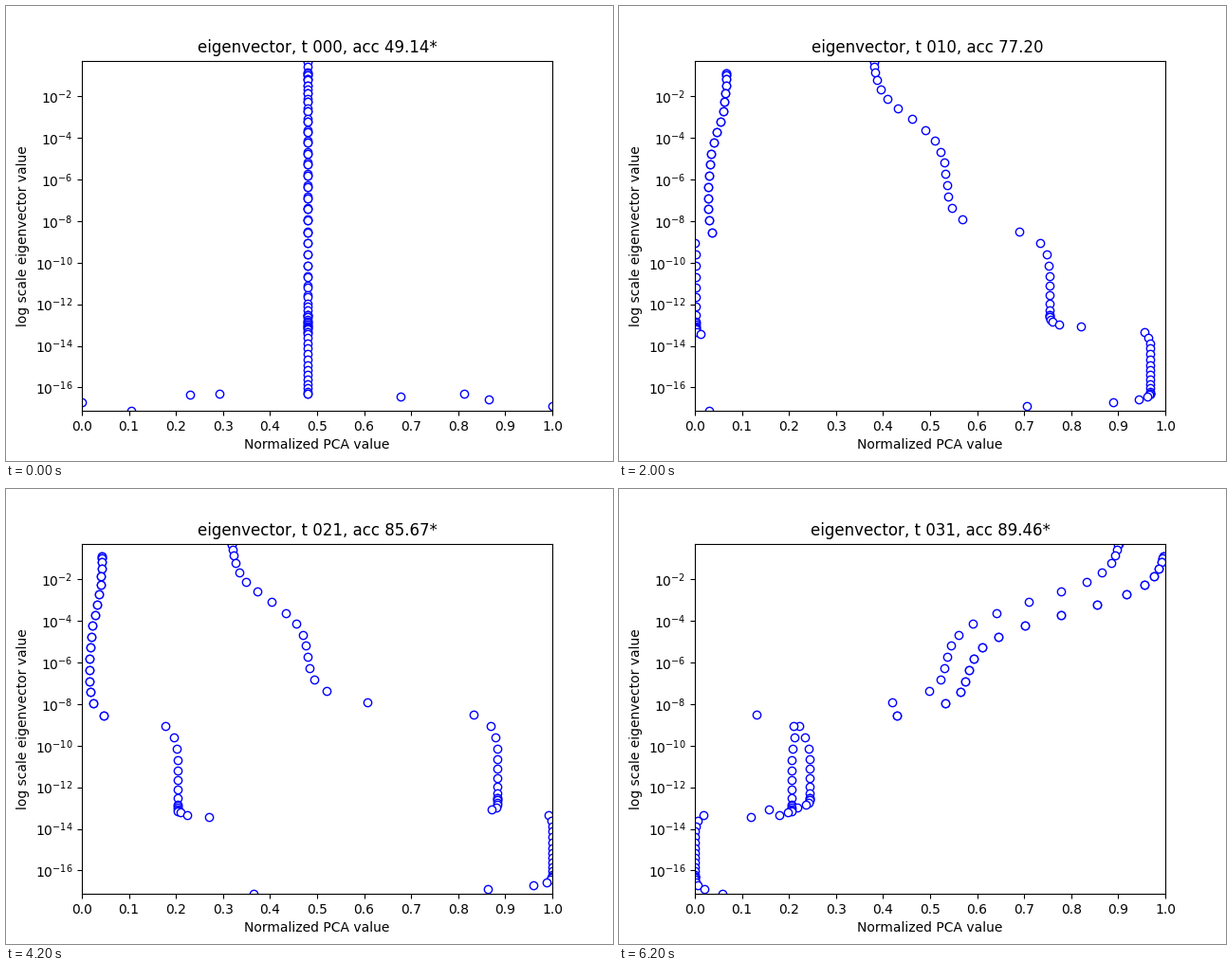
Write a matplotlib script that moves like this. It is 640 px wide and 480 px high and loops after 6.4 s.

```python
import numpy as np
import matplotlib.pyplot as plt
from matplotlib.animation import FuncAnimation

FRAMES, INTERVAL = 32, 200
TOP, HEIGHT = 57.6, 369.6          # plot area in pixels
TOP_EXP, DECADE = -0.275, 21.927   # exponent at the top, pixels per decade
FLIP = 24                          # the component changes sign here

plt.rcParams["font.family"] = "DejaVu Sans"


def bend(k):
    """Crowded near k = 0, evenly spaced further on."""
    return 12.37 * (np.hypot(k, 3.9) - 3.9)


def landing(bottom, steps, scale, tail):
    """Heights that slow down towards the bottom, then a loose tail."""
    return np.append(bottom - scale * bend(np.arange(steps, -1, -1)), tail)


# Heights in pixels, one array per chain.
falling = bend(np.arange(18))
pairs = 71 + falling
upper = TOP + falling
singles = landing(339.5, 10, 1.06, np.linspace(334, 346, 6))
lower = landing(327.5, 10, 1.06, np.linspace(326, 338, 6))
floor = landing(409.5, 14, 0.5, 409 + 18 * np.linspace(0, 1, 8) ** 2)

# The first chain is doubled.
heights = np.concatenate([pairs, pairs, singles, upper, lower, floor])
values = 10 ** (TOP_EXP - (heights - TOP) / DECADE)
order = np.argsort(heights, kind="stable")


def smooth_step(n):
    return 1 / (1 + np.exp((np.arange(n) - 7.9) / 1.3))


def decay(n):
    return 0.3 ** np.arange(n)


def chain(n, head, start, middle, end):
    """A constant middle that leans to start and end values."""
    tail = decay(n)[::-1]
    return middle + (start - middle) * head(n) + (end - middle) * tail


def pose(pair, single, up, low, ground, last):
    doubled = chain(len(pairs), smooth_step, *pair)
    return np.concatenate([
        doubled, doubled,
        chain(len(singles), decay, *single),
        chain(len(upper), smooth_step, *up),
        chain(len(lower), decay, *low),
        chain(len(floor) - 1, decay, *ground), [last]])


def first_pose():
    x = np.full(len(heights), 0.48)
    x[-8:] = 0.292, 0.812, 0.23, 0.677, 0.865, 0, 1, 0.105
    return x


# Start, middle and end of each chain, then the lowest point.
poses = {
    0: first_pose(),
    5: pose((.05, .02, .022), (0, .002, .01), (.988, .94, .938),
            (.873, .87, .87), (.671, .668, .625), .022),
    10: pose((.067, .028, .036), (0, .002, .012), (.38, .536, .569),
             (.69, .754, .821), (.956, .968, .706), .03),
    14: pose((.045, .021, .016), (0, .02, .042), (.31, .423, .508),
             (.671, .784, .805), (.992, .981, .714), .067),
    21: pose((.042, .015, .046), (.177, .204, .27), (.318, .483, .607),
             (.833, .884, .871), (.992, 1, .863), .365),
    27: pose((.993, .801, .631), (.474, .422, .26), (.845, .565, .405),
             (.105, .146, .133), (.014, 0, .04), .137),
    31: pose((.996, .575, .429), (.222, .206, .119), (.902, .53, .419),
             (.131, .244, .157), (.018, 0, .02), .059),
}
times = list(poses)

accuracy = np.interp(
    np.arange(FRAMES),
    [0, 5, 9, 10, 13, 14, 21, 26, 27, 31],
    [49.14, 73.49, 77.31, 77.20, 77.83, 77.77, 85.67, 89.20, 89.14, 89.46])


def oriented(x, t):
    return 1 - x if t >= FLIP else x


def positions(t):
    """Blend the neighbouring poses, with the sign change taken out."""
    k = min(np.searchsorted(times, t, side="right") - 1, len(times) - 2)
    start, end = times[k], times[k + 1]
    part = (t - start) / (end - start)
    x = (1 - part) * oriented(poses[start], start) + part * oriented(poses[end], end)
    return oriented(x, t)


fig, ax = plt.subplots(figsize=(6.4, 4.8), dpi=100)
ax.set_yscale("log")
ax.set_xlim(0, 1)
ax.set_ylim(10 ** (TOP_EXP - HEIGHT / DECADE), 10 ** TOP_EXP)
ax.set_xticks(np.arange(11) / 10)
ax.set_yticks([10.0 ** e for e in range(-16, 0, 2)])
ax.minorticks_off()
ax.set_xlabel("Normalized PCA value")
ax.set_ylabel("log scale eigenvector value")
dots, = ax.plot([], [], "o", mfc="white", mec="blue")
title = ax.set_title("")


def update(t):
    dots.set_data(positions(t)[order], values[order])
    mark = "*" if t == 0 or accuracy[t] > accuracy[:t].max() else " "
    title.set_text(f"eigenvector, t {t:03d}, acc {accuracy[t]:.2f}{mark}")
    return dots, title


animation = FuncAnimation(fig, update, frames=FRAMES, interval=INTERVAL,
                          repeat=True, repeat_delay=0)
plt.show()
```
